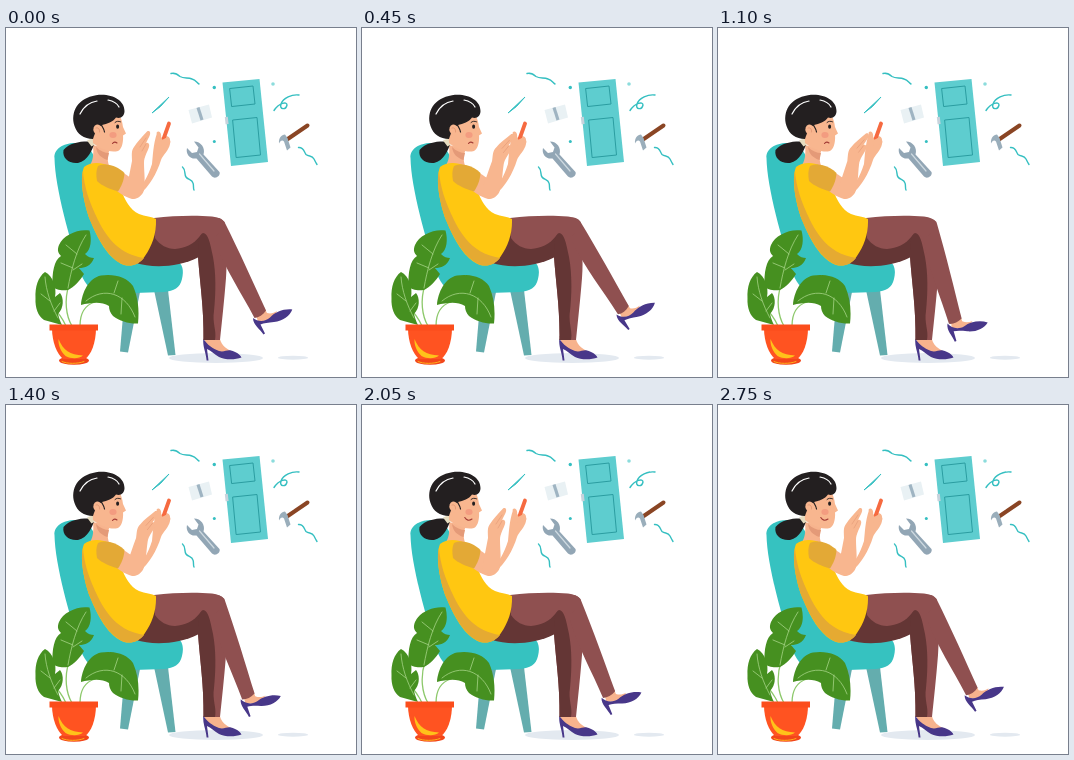
These frames come from a looping animation (350x349 px, 2800 ms). An HTML page:

```html
<!DOCTYPE html>
<html lang="en">
<head>
<meta charset="utf-8">
<title>Home repair</title>
<style>
html, body { margin: 0; width: 100%; height: 100%; overflow: hidden; background: #fff; }
svg { display: block; width: 100vw; height: 100vh; }
.line { fill: none; stroke-linecap: round; stroke-linejoin: round; }
</style>
</head>
<body>
<svg viewBox="0 0 350 349" preserveAspectRatio="none">
  <g fill="#e3e9f0">
    <ellipse cx="210" cy="330" rx="47" ry="5"/>
    <ellipse cx="287" cy="329.700" rx="15" ry="2"/>
  </g>

  <!-- floating tools -->
  <g class="line" stroke="#35bfc1" stroke-width="1.4">
    <path d="M165 45.500C169 44.500 171 46 174 48.500C178 51 182 49 186 51C190 52 191 55 193 56"/>
    <path d="M292.500 119.500C298 119 298 124 300 126.500C303 129 306 127 308 131C309 133 310 135 311 136.500"/>
    <path d="M176.500 139C180 142 178 146 180 149C182 152 186 151 187 155C188 158 187 160 188 162"/>
    <path d="M293 67C286 66 277 70 275 76C273 82 280 82 281 77C281 73 273 75 268 82.500"/>
  </g>
  <path d="M146 85L163 69L154.500 78.500Z" fill="#35bfc1" stroke="#35bfc1"/>
  <g fill="#35bfc1">
    <circle cx="208.300" cy="59.500" r="1.700"/>
    <circle cx="267" cy="56" r="1.800" fill="#8cdcdc"/>
    <circle cx="208.300" cy="113.500" r="1.500"/>
  </g>
  <path d="M216.500 54.500L253.500 51L262 134L225 138Z" fill="#5ecdcf"/>
  <g class="line" stroke="#2b9da1" stroke-width="1">
    <path d="M224 60.500L247 58L249 76L226 78.500Z"/>
    <path d="M227 92L251 89.500L254.500 127L230.500 129.500Z"/>
  </g>
  <path d="M218.800 89L221.800 88.700L222.600 96L219.600 96.300Z" fill="#c7d3dc"/>
  <path d="M182.500 82L203 76.500L206 89.500L186 95.500Z" fill="#e9f1f4"/>
  <path d="M190.500 80L193.500 79L197.500 91.500L194.500 92.500Z" fill="#9fb4c2"/>
  <path d="M301.500 97.500L281 111.500" class="line" stroke="#8a4524" stroke-width="4"/>
  <path d="M273 115.500C272.500 110 275.500 106.500 279 106.500L281.500 110L284.500 119.500L281 122.500L278 113.500C276 111.500 274.500 113 273 115.500Z" fill="#9aaebb"/>
  <path d="M181 120C179.500 126 184 131.500 190.500 130.500L206 148.500C209 151.500 215 148 213.500 144L197.500 126.500C199.500 120 195 113.500 188 113.500L192.500 119.500L191 124L186 125Z" fill="#92a6b5"/>
  <path d="M193.500 126L208 143" class="line" stroke="#cfdae1" stroke-width="1.200"/>

  <!-- chair -->
  <g fill="#64adae">
    <path d="M119 264L134 264L122 324.500L114 323.500Z"/>
    <path d="M148 262L162 262L169.500 327L162 327.500Z"/>
  </g>
  <path d="M48.500 130C47.500 121 58 114.500 70 115C82 116 86 122 90 134L118 236L170 233C177 235 178 243 176 251C174 260 168 263 158 264L98 266C86 265 79 256 75 246C64 212 49 160 48.500 130Z" fill="#36c2c0"/>

  <!-- standing leg -->
  <path d="M199 308L213.500 308C214 316 219 320 226 323.500L214 326L199 317Z" fill="#f7b38d"/>
  <path d="M197.300 310.500C201 317 207 320.500 213 323C218 324.500 221 321.500 225 322.500C230 324 234 326 235.500 329.500C229 332 219 332 213 329C208 326 205 322.500 201 321L202.500 332.500L200.600 332.500C200 324 196.500 319 197.300 310.500Z" fill="#483789"/>
  <path d="M130 235C145 240 172 240 193 229L212 205L198 192L150 195Z" fill="#643635"/>
  <path d="M195 206L217 200C221 222 221 236 220 250C218 275 216 292 214 312L197.500 312C198 280 194 258 192 228Z" fill="#8f5050"/>

  <!-- swinging leg -->
  <g id="leg">
    <path d="M248 281L258 279L261 285C265 286 268 285 271 283L267 292L252 293.500Z" fill="#f7b38d"/>
    <path d="M247 290C252 294 259 294 264 289.500C269 284 278 280.500 286.300 281.500C284 288 277 293 268 294C262 294.500 258 295 254.500 296.500L259 305.500L257.500 306.500C254 301 247 297 247 290Z" fill="#483789"/>
    <path d="M199 203C204 188 213 187 218.500 194C234 225 247 254 260 282.500C257 287 253 289.500 248.500 290C235 264 219 241 209 214Z" fill="#8f5050"/>
  </g>
  <path d="M148 190C168 187.500 190 187 206 188.500C212 189.500 216 191 218.500 194L219 201L206 211C201 206 197 204 194 208C187 217 179 220 169 221C161 221 154 217 149 210Z" fill="#8f5050"/>
  <path d="M192 229C192 215 193 206 197 205C202 205 204 214 207 229C210 245 210 264 208 283C206 295 211 303 209 312L197.500 312C198 280 194 256 192 229Z" fill="#643635"/>

  <!-- far arm and phone -->
  <path d="M128 166C137 158 142 148 146 136C147 128 147 117 151 105C153 102 156 105 155 110L160 108C163 108 165 111 164 116C163 122 157 127 155 132C151 145 143 159 134 166Z" fill="#f8b68f"/>
  <path d="M163 95.500L157.500 111" class="line" stroke="#f66a40" stroke-width="3.800"/>
  <path d="M152 105L155 112M157 113L162 110.500M157 117L163 114" class="line" stroke="#f8b68f" stroke-width="2.800"/>

  <!-- torso -->
  <path d="M87 117L104 121C101 127 101 134 104 140L93 146L82 140C87 134 88 127 87 117Z" fill="#f7b38d"/>
  <path d="M90 119C94 123 99 125 103 125L101.500 132C95 130 91 126 90 119Z" fill="#e49a78"/>
  <path d="M78 139C84 134.500 94 133.500 103 138C112 142 118 150 115 162C119 172 124 182 133 186C139 188.500 146 188.500 150 191C150.500 206 146 218 139 228C134 236 126 239 118 237C102 231 92 211 84 192C78 176 73 151 78 139Z" fill="#ffc711"/>
  <path d="M77 143C78 158 83 174 92 192C102 212 114 226 138 230C133 237 124 239 117 236.500C102 230 91 209 84 192C78 176 74 154 77 143Z" fill="#e5aa32"/>

  <!-- near arm -->
  <path d="M113 142C119 146 126 151 137 156C141 163 134 171.500 126 171C118 169 111 163 105 159Z" fill="#f8b68f"/>
  <g id="arm" fill="#f8b68f">
    <path d="M120 164C122 154 124 143 126 133C126 127 125 123 128 119C131 114 136 109 141 103.500C144 102 145 105 143.500 108L140 115C142 114 144 116 143 119C141 125 138 129 138 135C138 146 140 155 137 162C133 170 122 172 120 164Z"/>
    <path d="M134 119L140 110M136 123L140 116" class="line" stroke="#e69d79" stroke-width=".7"/>
  </g>
  <path d="M92 138C102 134 112 139 118.500 145C118 153 115 159 112 163.500C104 161 96 158 91 153C90 147 90 142 92 138Z" fill="#e3a936"/>

  <!-- head -->
  <path d="M89 114C80 113 65 113 57.500 122C56 130 63 136 72 135C82 133 86 122 89 114Z" fill="#231f20"/>
  <path d="M81 112.500L87 110L91 115L85.500 118.500Z" fill="#e6dcc0"/>
  <path d="M86 96L112 86C116 90 116.500 96 117 99L120 105.500L117 107.500C117.500 112 116.500 121 112 123C104 125 94 121 87 115Z" fill="#f8b68f"/>
  <ellipse cx="107" cy="107" rx="3.600" ry="3" fill="#f39c80"/>
  <path d="M68.500 98C64 84 72 70 90 67.300C105 65 118.500 72 118.500 83C118.500 88 115 91 110 89.500C107 94 101 96 96 97C92 99 89 104 87 111C78 111 71 106 68.500 98Z" fill="#231f20"/>
  <ellipse cx="92" cy="102" rx="4.500" ry="5.500" fill="#f8b68f" transform="rotate(-20 92 102)"/>
  <path d="M90 100C92 99 94 101 93.500 104" class="line" stroke="#df9370" stroke-width=".8"/>
  <path d="M95 96C96 99 98 100 98.500 104" class="line" stroke="#231f20" stroke-width="1.200"/>
  <path d="M74 86C78 78 84 74 91 73M102 72C107 73 111 75 113 79" class="line" stroke="#fff" stroke-width="1.200"/>
  <path d="M109 94.500C110.500 93 112.500 93 114.500 93.800" class="line" stroke="#231f20" stroke-width=".9"/>
  <ellipse id="eye" cx="111.600" cy="98.700" rx="1.500" ry="2.100" fill="#231f20"/>
  <path id="mouth" class="line" stroke="#a23b35" stroke-width="1.100"/>

  <!-- plant -->
  <g class="line" stroke="#8cc86a" stroke-width="1.300">
    <path d="M66 298C60 288 58 272 63 257M60 298C56 289 50 282 44 276M74 298C74 285 79 277 89 274"/>
  </g>
  <g fill="#469020">
    <path d="M83.500 202.500C72 200.500 57 207 53 217C51 222 52 225 55 228C48 232 46 245 46.500 258C49 262 56 263 62 262C68 259 74 253 78 246L73 240C79 240 85 238 88 230C85 230 82 229 79 226C85 222 86 212 83.500 202.500Z"/>
    <path d="M39 244C32 249 29 259 29.500 270C29 280 32 288 38 292C44 293.500 50 295.500 56 297C54 293 53 290 52 286C58 280 58 270 54 265L49 269C51 260 47 248 39 244Z"/>
    <path d="M75 277C76 264 83 250 95 247.500C108 245.500 121 249 127 258C132 269 133.500 282 132 295.500C123 296 114 293 107 288C104 285 103 281 103 278C95 273 84 275 75 277Z"/>
  </g>
  <g class="line" stroke="#a5d486" stroke-width=".8">
    <path d="M62 260C65 243 70 222 80 207M67 240L55 235M71 226L60 217M67 242L76 236"/>
    <path d="M52 290C45 277 40 263 39 249M44 273L35 266M48 283L54 275"/>
    <path d="M80 273C98 258 120 265 129 289M108 265L112 253M116 270L115 286"/>
  </g>
  <ellipse cx="68" cy="332.500" rx="15" ry="4.300" fill="#f2461b"/>
  <path d="M46 300L90 300C90 315 85 327 79 331L57 331C51 326 46 314 46 300Z" fill="#ff5321"/>
  <path d="M43.500 296.500H92V302.500H43.500Z" fill="#fb4d1c"/>
  <path d="M52.500 311C57 322 64 327 77 327.500C73 331 65 331 59.500 328C55 324 52 317 52.500 311Z" fill="#ffc21a"/>
  <path d="M56 333.500C61 336 72 336 78 333.500" class="line" stroke="#ffb01a" stroke-width="1"/>
</svg>
<script>
const LOOP = 2800;
const swing = [[0, 0], [650, -6], [1130, 10.7], [1850, 0.3], [2300, 10.5], [2800, 0]];
const tap = [[0, 0], [400, 8.6], [540, 8.6], [640, 7], [740, 8.6], [1020, 8.6], [1120, 7], [1220, 8.6], [1600, 8.6], [2000, 0], [2800, 0]];
const smile = [[0, 0], [1550, 0], [1850, 1], [2800, 1]];
const blink = [[0, 1], [180, 1], [260, 0.12], [340, 1], [2800, 1]];

const get = id => document.getElementById(id);
const [leg, arm, eye, mouth] = ['leg', 'arm', 'eye', 'mouth'].map(get);
const mix = (a, b, k) => a + (b - a) * k;

// Cosine-eased value between neighbouring keys
function at(keys, t) {
  const i = keys.findIndex(key => key[0] > t);
  const [t0, a] = keys[i - 1], [t1, b] = keys[i];
  return mix(a, b, (1 - Math.cos(Math.PI * (t - t0) / (t1 - t0))) / 2);
}

function draw(t) {
  leg.setAttribute('transform', `rotate(${at(swing, t)} 208 198)`);
  arm.setAttribute('transform', `rotate(${at(tap, t)} 128 160)`);
  eye.setAttribute('ry', 2.1 * at(blink, t));
  const k = at(smile, t);
  mouth.setAttribute('d',
    `M${mix(106.5, 102.8, k)} ${mix(115.5, 112.5, k)}` +
    `Q${mix(108.5, 105.5, k)} ${mix(113, 117, k)} ${mix(111, 110, k)} ${mix(115, 114, k)}`);
}

function tick(now) {
  draw(now % LOOP);
  requestAnimationFrame(tick);
}
draw(0);
requestAnimationFrame(tick);
</script>
</body>
</html>
```
